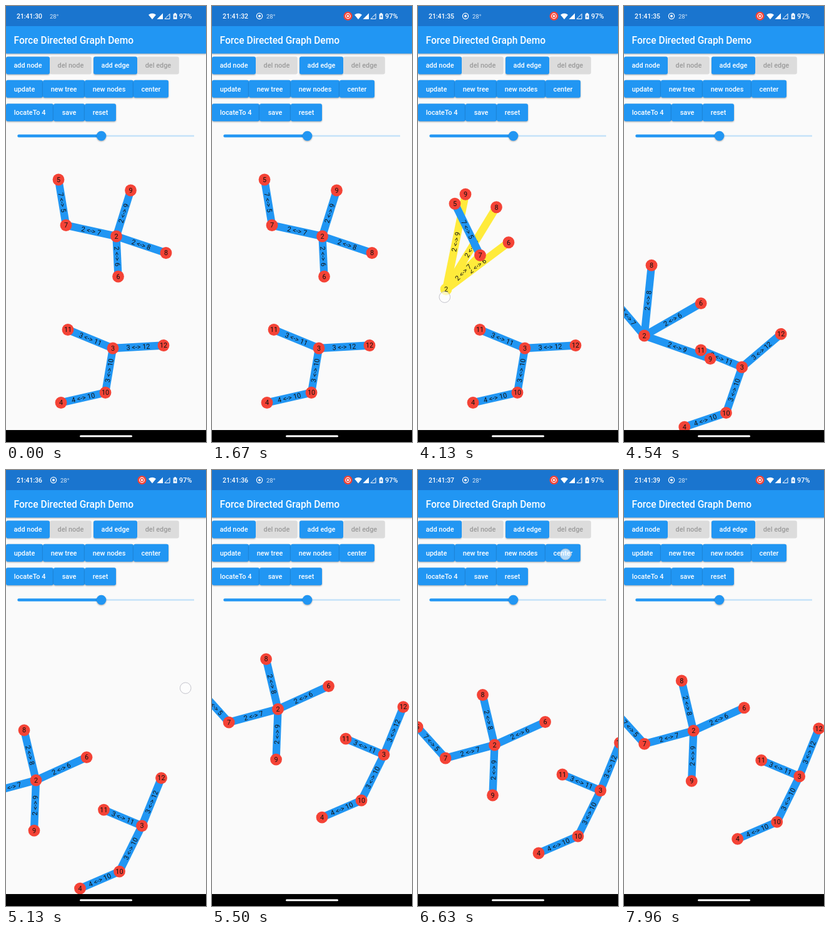
Write an HTML page that moves like this. It is 320 px wide and 693 px high and loops after 8 s.

```html
<!DOCTYPE html>
<html lang="en">
<head>
<meta charset="utf-8">
<title>Force Directed Graph Demo</title>
<style>
  html, body { margin: 0; width: 100%; height: 100%; overflow: hidden; background: #fafafa; }
  svg { display: block; width: 100vw; height: 100vh; }
  text { font: 10.9px Roboto, sans-serif; fill: #111; }
  .mid { text-anchor: middle; }
  .medium { font-weight: 500; }
  .light { fill: #fff; }
  .raised { filter: drop-shadow(0 1.5px 1px rgba(0, 0, 0, .32)); }
</style>
</head>
<body>
<svg id="stage" viewBox="0 0 320 693">
  <g id="graph"></g>
  <g id="ui">
    <rect class="raised" y="32" width="320" height="43.6" fill="#2196f3"/>
    <rect width="320" height="32" fill="#1a75cf"/>
    <text class="light medium" x="12.5" y="60" style="font-size:15.57px">Force Directed Graph Demo</text>
    <text id="clock" class="light medium" x="17" y="19.8" style="font-size:10.4px"></text>
    <text id="degrees" class="light" y="19.6" style="font-size:9.5px" opacity=".85">28°</text>
    <g id="recording">
      <g fill="none" stroke="#fff" stroke-width="1.2">
        <circle cx="76" cy="16" r="4.6"/>
        <circle cx="217.5" cy="16" r="7" fill="#f44336" stroke="none"/>
        <circle cx="217.5" cy="16" r="3.8"/>
      </g>
      <circle cx="76" cy="16" r="2" fill="#fff"/>
      <circle cx="217.5" cy="16" r="1.7" fill="#fff"/>
    </g>
    <g fill="#fff">
      <path d="M228 14 Q234 9.5 240 14 L234 21.3Z"/>
      <path d="M241.5 21 H251 V11.5Z"/>
      <path d="M254 20.5 H262 V12.5Z" fill="none" stroke="#fff"/>
      <path d="M267.7 12.5 H269.2 V11.3 H272 V12.5 H273.5 V21 H267.7Z"/>
      <path d="M271.2 13.8 L269.2 17.2 H270.4 V19.6 L272.2 16.2 H271Z" fill="#1a75cf"/>
    </g>
    <text class="light medium" x="277" y="19.8">97%</text>
    <path d="M152.5 206.5 H301" stroke="#c5e2f8" stroke-width="2.6"/>
    <path d="M20.5 206.5 H152.5" stroke="#2196f3" stroke-width="4.4" stroke-linecap="round"/>
    <circle class="raised" cx="152.5" cy="206.5" r="7.8" fill="#2196f3"/>
  </g>
  <circle id="finger" r="8.8" fill="#fff" stroke="#b4b4be" stroke-width=".8"/>
  <rect y="674" width="320" height="19"/>
  <rect x="118" y="682.3" width="84" height="3" rx="1.5" fill="#fafafa"/>
</svg>
<script>
const LOOP = 8000, BLUE = '#2196f3', RED = '#f44336', YELLOW = '#ffeb3b';
const byId = id => document.getElementById(id);

function set(el, attrs) {
  for (const name in attrs) el.setAttribute(name, attrs[name]);
}
function add(parent, tag, attrs, content = '') {
  const el = document.createElementNS('http://www.w3.org/2000/svg', tag);
  set(el, attrs);
  el.textContent = content;
  return parent.appendChild(el);
}

const progress = (t, start, end) => Math.min(1, Math.max(0, (t - start) / (end - start)));
const ease = (t, start, end) => {
  const u = progress(t, start, end);
  return u * u * (3 - 2 * u);
};
const mix = (a, b, u) => a + (b - a) * u;
const mixPoint = (p, q, u) => [mix(p[0], q[0], u), mix(p[1], q[1], u)];
const plus = (p, q) => [p[0] + q[0], p[1] + q[1]];
const minus = (p, q) => [p[0] - q[0], p[1] - q[1]];

// Swings an offset around its origin, taking the shorter way.
function swing(from, to, u) {
  const start = Math.atan2(from[1], from[0]);
  const turn = Math.atan2(to[1], to[0]) - start;
  const angle = start + u * Math.atan2(Math.sin(turn), Math.cos(turn));
  const length = mix(Math.hypot(...from), Math.hypot(...to), u);
  return [length * Math.cos(angle), length * Math.sin(angle)];
}

// Smooth path through [time, x, y] keys that never overshoots a key.
function along(keys, t) {
  const last = keys.length - 1;
  if (t <= keys[0][0]) return keys[0].slice(1);
  if (t >= keys[last][0]) return keys[last].slice(1);
  const i = keys.findIndex(key => key[0] > t) - 1;
  const span = keys[i + 1][0] - keys[i][0], u = (t - keys[i][0]) / span, v = 1 - u;
  return [1, 2].map(axis => {
    const slope = k => (keys[k + 1][axis] - keys[k][axis]) / (keys[k + 1][0] - keys[k][0]);
    const tangent = k => {
      if (k === 0 || k === last) return 0;
      const a = slope(k - 1), b = slope(k);
      return a * b <= 0 ? 0 : 2 * a * b / (a + b);
    };
    return mix(keys[i][axis], keys[i + 1][axis], u * u * (3 - 2 * u))
      + span * u * v * (tangent(i) * v - tangent(i + 1) * u);
  });
}

const dragged = t => along([[3250, 176.5, 366], [3380, 206, 329], [3500, 222, 285],
  [3750, 80, 295], [4130, 45, 450], [4500, 32.5, 524]], t);

function pan(t) {
  const up = ease(t, 5000, 5440), down = ease(t, 5440, 6170), center = ease(t, 6650, 7210);
  return [72.7 * up + 17.3 * down - 11.3 * center, -145.1 * up + 58.1 * down - 22.6 * center];
}

// Parents come before their children; "pulled" is where the drag leaves a node.
const nodes = [
  { id: 2 },
  { id: 6, parent: 2, start: [179.5, 430], pulled: [145, 375.5], settled: [113.5, 487.5] },
  { id: 7, parent: 2, start: [96, 348.5], pulled: [99.5, 396], settled: [-46, 545] },
  { id: 8, parent: 2, start: [256, 392.5], pulled: [125.5, 319.5], settled: [13.5, 444.5] },
  { id: 9, parent: 2, start: [199.5, 293], pulled: [76, 299], settled: [29.5, 604] },
  { id: 5, parent: 7, start: [84, 276], pulled: [59, 314], settled: [-91, 495.5] },
  { id: 3, start: [171, 544], settled: [202, 596.5] },
  { id: 10, parent: 3, start: [159, 614.5], settled: [166, 669] },
  { id: 11, parent: 3, start: [99, 514.5], settled: [141, 571] },
  { id: 12, parent: 3, start: [252, 539.5], settled: [233, 520.5] },
  { id: 4, parent: 10, start: [88, 630.5], settled: [103, 696] }
];
const nodeById = Object.fromEntries(nodes.map(node => [node.id, node]));
Object.assign(nodeById[2], { start: dragged(0), pulled: dragged(4130), settled: dragged(LOOP) });
for (const node of nodes) node.pulled ??= node.start;

function place(node, t, at) {
  if (node.id === 2) return dragged(t);
  const settling = ease(t, 4130, 4880);
  if (!node.parent) return mixPoint(node.start, node.settled, settling);

  const parent = nodeById[node.parent], center = at[node.parent];
  if (settling > 0) {
    return plus(center, swing(minus(node.pulled, parent.pulled), minus(node.settled, parent.settled), settling));
  }
  // The edge acts as a spring that tugs the trailing node.
  const follow = progress(t, 3380, 4130);
  const toParent = minus(center, node.start), distance = Math.hypot(...toParent);
  const rest = Math.hypot(...minus(parent.start, node.start));
  const tug = .12 * (1 - follow) * (distance - rest) / distance;
  return plus(mixPoint(node.start, node.pulled, follow), toParent.map(d => d * tug));
}

const graph = byId('graph');
const edges = [[2, 6], [2, 8], [2, 9], [2, 7], [7, 5], [3, 10], [3, 11], [3, 12], [4, 10]].map(([a, b]) => ({
  a, b,
  line: add(graph, 'line', { 'stroke-width': 12.3 }),
  label: add(graph, 'text', { class: 'mid', y: 3.9 }, `${a} <-> ${b}`)
}));
for (const node of nodes) {
  node.group = add(graph, 'g', {});
  node.disc = add(node.group, 'circle', { r: 9.4 });
  add(node.group, 'text', { class: 'mid', y: 3.9 }, node.id);
}

function buttonRow(row, ...buttons) {
  const y = 80.4 + row * 37.4, ui = byId('ui');
  for (const [x, width, label] of buttons) {
    const enabled = !label.startsWith('del');
    add(ui, 'rect', { x, y, width, height: 28, rx: 3,
      fill: enabled ? BLUE : '#dcdcdc', class: enabled ? 'raised' : '' });
    add(ui, 'text', { x: x + width / 2, y: y + 17.9, class: 'mid medium',
      style: `fill:${enabled ? '#fff' : '#9b9b9b'}` }, label);
  }
}
buttonRow(0, [0, 70, 'add node'], [70, 66.8, 'del node'], [140, 70, 'add edge'], [210, 66.8, 'del edge']);
buttonRow(1, [0, 59, 'update'], [59, 67, 'new tree'], [126, 78, 'new nodes'], [204, 56, 'center']);
buttonRow(2, [0, 76, 'locateTo 4'], [76, 50, 'save'], [126, 50, 'reset']);

// The graph trails the finger by a short lag.
function fingerAt(t) {
  if (t >= 2980 && t < 4500) return dragged(t + 45);
  if (t >= 4930 && t < 6130) return plus([264, 393], pan(t + 35));
  if (t >= 6600 && t < 6740) return [236, 134];
}

function draw(t) {
  const held = t >= 3000 && t < 4500 ? 2 : null;
  const at = {}, shift = pan(t);
  for (const node of nodes) {
    at[node.id] = place(node, t, at);
    set(node.group, { transform: `translate(${at[node.id]})` });
    set(node.disc, { fill: node.id === held ? YELLOW : RED });
  }
  for (const { a, b, line, label } of edges) {
    const [x1, y1] = at[a], [x2, y2] = at[b];
    const angle = Math.atan((y2 - y1) / (x2 - x1)) * 180 / Math.PI;
    set(line, { x1, y1, x2, y2, stroke: a === held || b === held ? YELLOW : BLUE });
    set(label, { transform: `translate(${mixPoint(at[a], at[b], .5)}) rotate(${angle})` });
  }
  set(graph, { transform: `translate(${shift})` });

  const finger = fingerAt(t);
  set(byId('finger'), { visibility: finger ? 'visible' : 'hidden', 'fill-opacity': .65 });
  if (finger) set(byId('finger'), { transform: `translate(${finger})` });

  const shown = ease(t, 40, 670);
  set(byId('recording'), { opacity: shown });
  set(byId('degrees'), { x: mix(70, 87, shown) });
  byId('clock').textContent = '21:41:' + (t < 40 ? 30 : 31 + Math.floor((t + 40) / 1000));
}

function frame() {
  draw(performance.now() % LOOP);
  requestAnimationFrame(frame);
}
frame();
</script>
</body>
</html>
```
